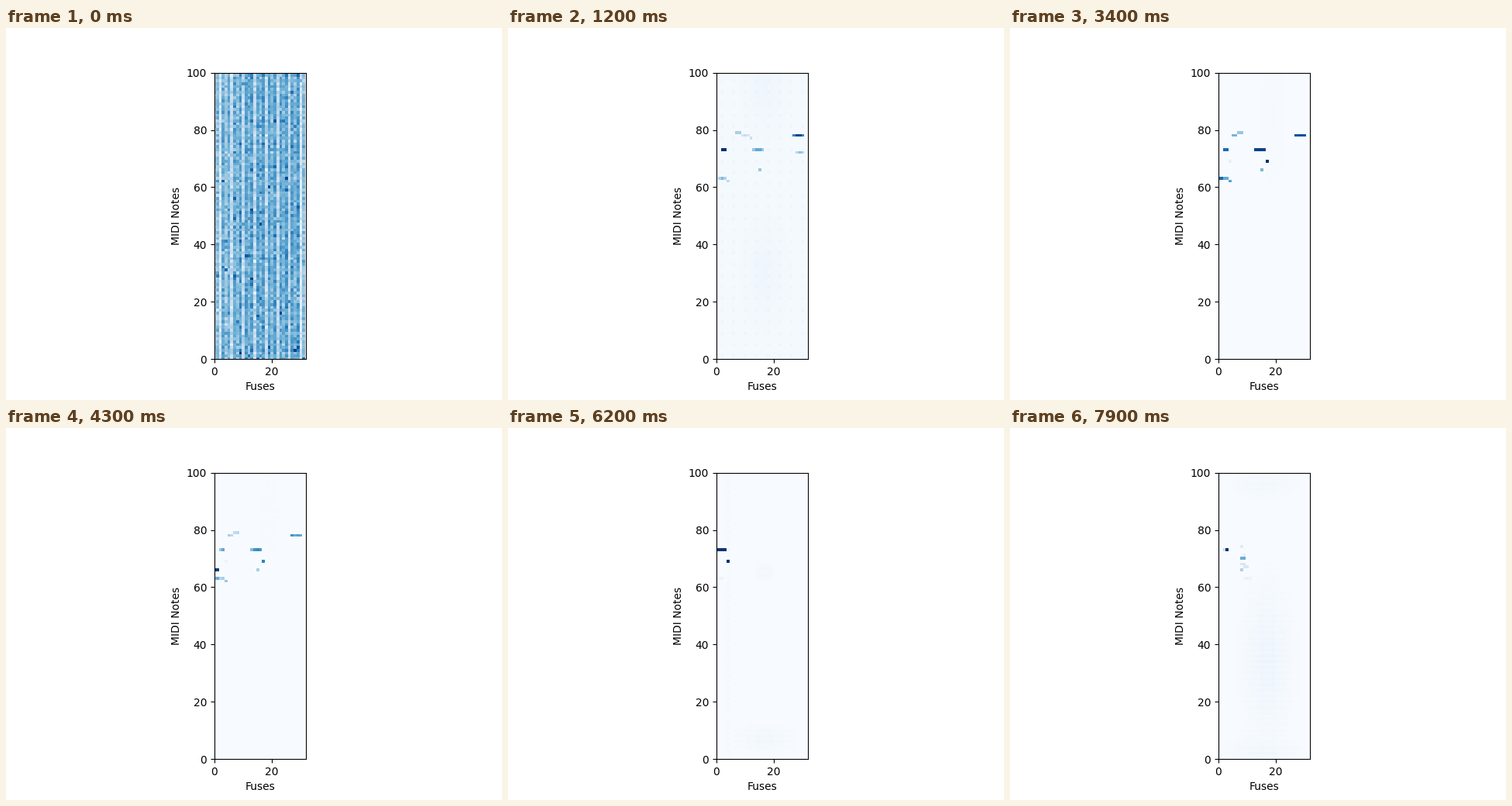
Write a matplotlib script that moves like this. It is 640 by 480 pixels and loops after 8000 ms.

```python
import numpy as np
import matplotlib.pyplot as plt
from matplotlib.animation import FuncAnimation

FRAMES, STEP = 80, 100
NOTES, FUSES = 128, 32
row, col = np.mgrid[0:NOTES, 0:FUSES]
even = row % 2 == 0


def bars(fade, *runs):
    """Notes as (pitch, first fuse, length, level), fading from the middle."""
    grid = np.zeros((NOTES, FUSES))
    for note, first, count, level in runs:
        away = np.abs(np.arange(count) - (count - 1) / 2) / count
        grid[note, first:first + count] = level * (1 - fade * away)
    return grid


def glow(r, c, dr, dc, level):
    return level * np.exp(-((row - r) / dr) ** 2 - ((col - c) / dc) ** 2)


def mesh(*spot):
    return glow(*spot) * (.5 + .3 * even + .2 * (col % 4 == 3))


def raw_noise():
    rng = np.random.default_rng(4)
    stripes = .44 + .1 * (col % 2) - .17 * (col % 4 == 2)
    edge = .13 * np.exp(-(col / 5) ** 2) + .12 * (col > 29)
    peaks = .16 * (row % 8 == 3) * (col % 4 == 1) * (col > 6)
    grid = stripes - edge + peaks + .06 * (col == 3)
    grid += .03 * np.where((row + col) % 2, 1, -1)
    grid += rng.normal(0, .065, row.shape)
    grid[rng.random(row.shape) < .012] += .3
    return np.clip(grid, .08, 1)


def dot_pattern():
    rng = np.random.default_rng(9)
    grid = .2 + .1 * np.exp(-col / 2) - .05 * (col % 4 == 1)
    grid += .04 * np.where((row + col) % 2, 1, -1)
    grid += .1 * (col > 29) - .07 * ((col > 3) & (col < 8))
    grid += .25 * (col == 3) + .3 * (col == 29)
    dots = (col % 4 == 0) & (col > 7)
    grid = np.where(dots & even, .56 + .012 * col + .12 * (row % 8 == 2), grid)
    grid += .35 * ((col % 4 == 1) & (col > 7) & (row % 4 == 3))
    grid += rng.normal(0, .02, row.shape)
    corners = bars(0, (1, 1, 1, .8), (3, 1, 2, .5), (1, 30, 2, .8))
    return np.clip(np.maximum(grid, corners), 0, 1)


haze = (.012 + glow(30, 17, 14, 6, .025) + glow(96, 17, 14, 6, .025)
        + .025 * ((row % 4 == 1) & (col % 4 == 2)))
sparse = np.maximum(haze, bars(
    .9, (79, 7, 2, .4), (78, 9, 3, .22), (77, 12, 1, .2), (73, 2, 2, 1.2),
    (73, 13, 4, .55), (66, 15, 1, .36), (63, 1, 3, .42), (62, 4, 1, .25),
    (78, 27, 4, .95), (72, 28, 3, .38)))

firm = bars(
    .1, (79, 7, 2, .4), (78, 5, 2, .48), (73, 2, 2, .8), (73, 13, 4, .95),
    (69, 17, 1, 1), (66, 15, 1, .46), (63, 0, 2, .8), (63, 2, 2, .53),
    (62, 4, 1, .55), (78, 27, 4, .9), (69, 4, 1, .08))
firm += glow(85, 19, 30, 5, .008)

single = bars(0, (66, 0, 2, 1))

chord = bars(0, (73, 0, 4, 1), (69, 4, 1, 1), (63, 0, 3, .05))
chord += mesh(7, 17, 4, 8, .04) + mesh(65, 17, 3, 3, .03)
chord += .02 * ((col == 4) & ~even)

cluster = np.maximum(
    mesh(34, 17, 22, 7, .06) + mesh(96, 16, 5, 9, .03) + mesh(2, 14, 4, 12, .03),
    bars(.9, (73, 3, 1, 1), (73, 2, 1, .25), (70, 8, 2, .65), (68, 8, 2, .2),
         (67, 9, 2, .2), (66, 8, 1, .32), (74, 8, 1, .12), (71, 9, 1, .1),
         (63, 9, 3, .07)))

# frame, grid, easing power of the way to the next grid
KEYS = [(0, raw_noise(), 1), (3, dot_pattern(), 2.2), (12, sparse, 2.5),
        (34, firm, 1.2), (52, single, 1), (62, chord, 1), (79, cluster, 1)]


def grid_at(i):
    k = max(n for n, key in enumerate(KEYS[:-1]) if key[0] <= i)
    (start, a, power), (end, b, _) = KEYS[k:k + 2]
    u = (i - start) / (end - start)
    mix = 1 - (1 - u) ** power
    wobble = np.random.default_rng(100 + i).normal(0, .12, row.shape)
    grid = (a + (b - a) * mix) * (1 + wobble * np.sin(np.pi * u))
    return np.clip(grid / grid[:101].max(), 0, 1)


fig, ax = plt.subplots(figsize=(6.4, 4.8), dpi=100)
image = ax.imshow(grid_at(0), cmap="Blues", vmin=0, vmax=1,
                  interpolation="nearest")
ax.set(xlim=(0, 32), ylim=(0, 100), xlabel="Fuses", ylabel="MIDI Notes")


def update(i):
    image.set_data(grid_at(i))
    return image,


anim = FuncAnimation(fig, update, frames=FRAMES, interval=STEP,
                     repeat=True, repeat_delay=0)
plt.show()
```
